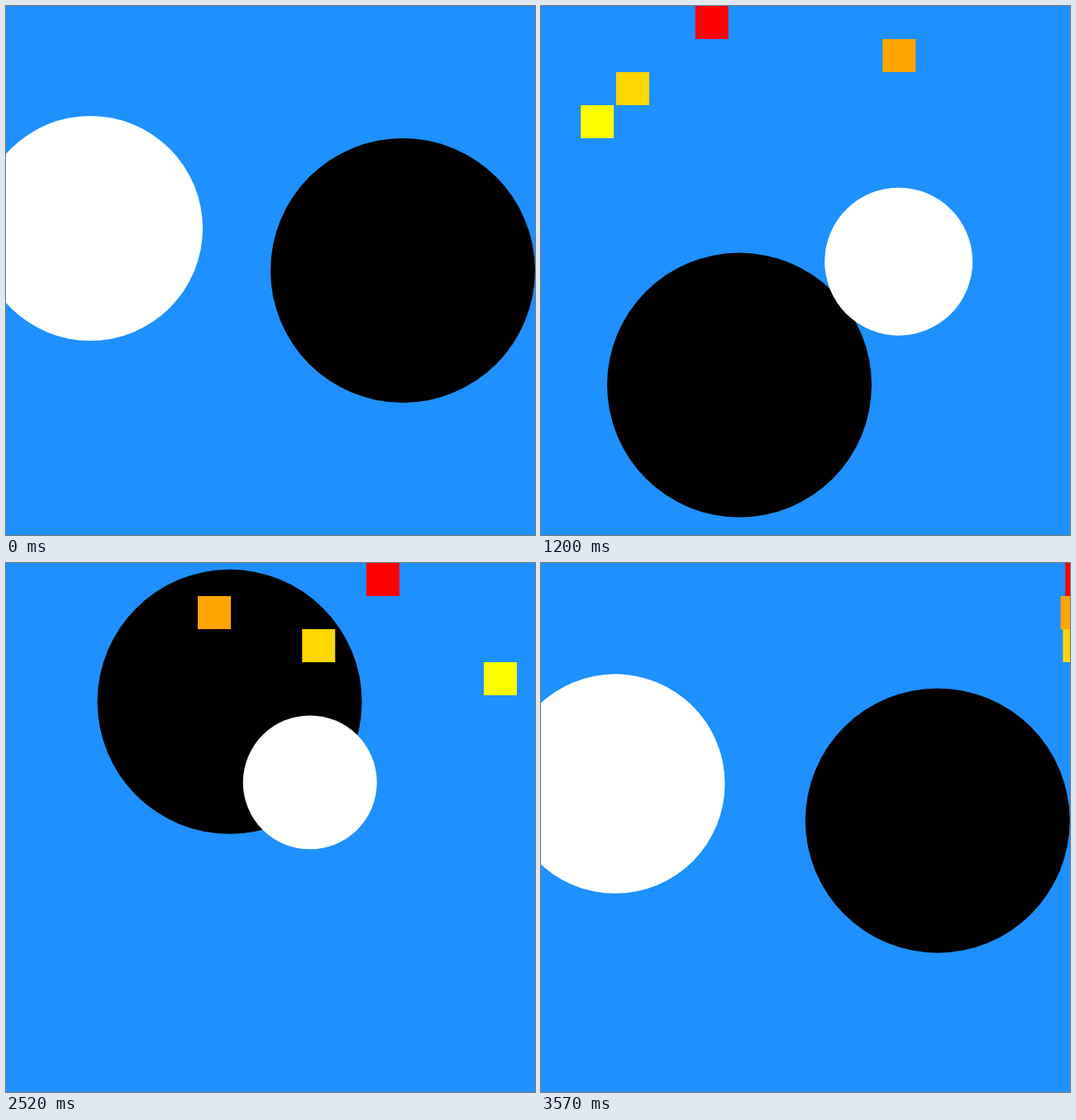
An HTML page with a canvas for the animation above (3.6 s loop, 640x640 px).

```html
<!DOCTYPE html>
<html>
<head>
<meta charset="utf-8">
<style>
  html, body { margin: 0; width: 100%; height: 100%; overflow: hidden; background: dodgerblue; }
  canvas { display: block; }
</style>
</head>
<body>
<canvas id="stage" width="640" height="640"></canvas>
<script>
const ctx = document.getElementById('stage').getContext('2d');
const LOOP = 3600, STEP = 30, SIZE = 640, BOX = 40;

// Key poses of the drifting white disc; "at" is in degrees of the loop
const pose = (at, x, y, r) => ({ at, x, y, r });
const poses = [
  pose(0, 102, 269, 136),
  pose(33, 282, 240, 156),
  pose(90, 339, 272.6, 99),
  pose(150, 503.4, 372.7, 86.7),
  pose(183, 470, 491, 82),
  pose(207, 401, 425.4, 79.3),
  pose(297, 298, 171.6, 92.3),
  pose(342, 45, 248, 114)
];

// Pose lookup that wraps around the loop
function poseAt(i) {
  const turn = Math.floor(i / poses.length), p = poses[i - turn * poses.length];
  return { ...p, at: p.at + turn * 360 };
}

function tangent(i, key) {
  const [a, b, c] = [i - 1, i, i + 1].map(poseAt);
  const before = b.at - a.at, after = c.at - b.at;
  return ((b[key] - a[key]) / before * after + (c[key] - b[key]) / after * before) / (before + after);
}

// Smooth closed curve through the poses (cubic Hermite)
function drift(angle, key) {
  const i = poses.findLastIndex(p => p.at <= angle);
  const a = poseAt(i), b = poseAt(i + 1), h = b.at - a.at;
  const u = (angle - a.at) / h, v = 1 - u;
  return a[key] * v * v * (1 + 2 * u) + b[key] * u * u * (1 + 2 * v)
    + h * u * v * (tangent(i, key) * v - tangent(i + 1, key) * u);
}

const easeInOut = (p, power) =>
  p < 0.5 ? (2 * p) ** power / 2 : 1 - (2 - 2 * p) ** power / 2;

const runners = [
  ['red', p => p],
  ['orange', p => p * 2 % 1],
  ['gold', p => p ** 1.5],
  ['yellow', p => easeInOut(p, 10 / 3)]
];

function disc(color, x, y, radius) {
  ctx.fillStyle = color;
  ctx.beginPath();
  ctx.arc(x, y, radius, 0, 2 * Math.PI);
  ctx.fill();
}

function draw() {
  const p = Math.floor(performance.now() % LOOP / STEP) * STEP / LOOP;
  const theta = p * 2 * Math.PI, angle = p * 360;
  ctx.fillStyle = 'dodgerblue';
  ctx.fillRect(0, 0, SIZE, SIZE);
  disc('black', 320 + 160 * Math.cos(theta), 320 + 160 * Math.sin(theta), 160);
  disc('white', drift(angle, 'x'), drift(angle, 'y'), drift(angle, 'r'));
  runners.forEach(([color, ease], row) => {
    ctx.fillStyle = color;
    ctx.fillRect(ease(p) * (SIZE + BOX) - BOX, row * BOX, BOX, BOX);
  });
  requestAnimationFrame(draw);
}
draw();
</script>
</body>
</html>
```
